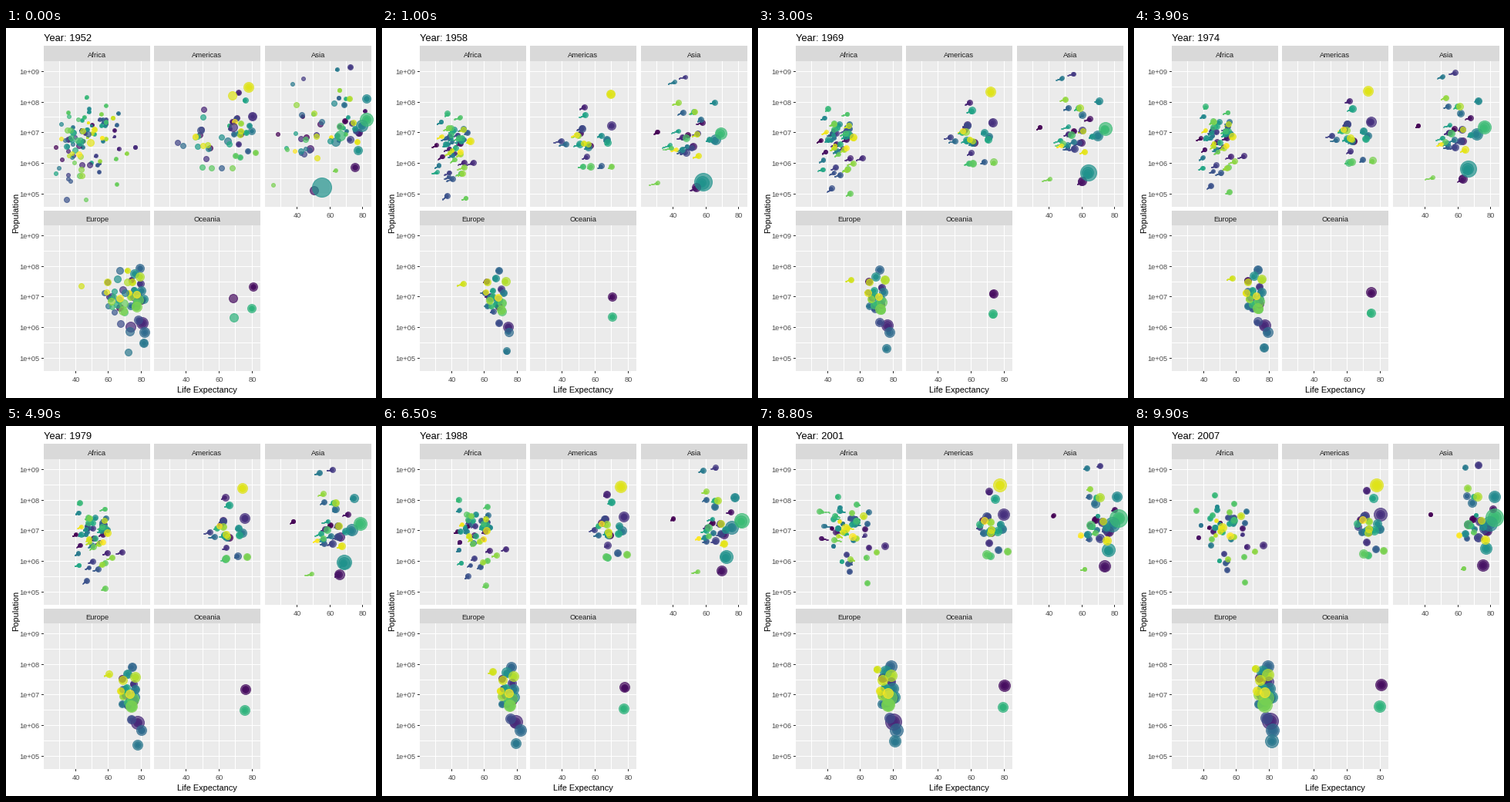
A matplotlib script that plays this animation: 480 by 480 pixels, repeating every 10 s.

```python
import numpy as np
import matplotlib
import matplotlib.pyplot as plt
from matplotlib.animation import FuncAnimation
from matplotlib.patches import Rectangle

FRAMES, WAKE, ALPHA = 100, 10, 0.7
LEFT, TOP = (49.2, 192.8, 336.4), (43, 256.2)
WIDTH, HEIGHT = 138.1, 189.6
X0, X1 = 20.65, 85.55      # life expectancy
Y0, Y1 = 4.561, 9.337      # log10 of population
TITLES = ("Africa", "Americas", "Asia", "Europe", "Oceania")
AF, AM, AS, EU, OC = range(5)

plt.rcParams["font.family"] = "Liberation Sans"
rng = np.random.default_rng(12)
u = np.linspace(0, 1, FRAMES)
gain = 1 - (1 - u) ** 1.4
xs, ys, sizes, hues = [], [], [], []


def px(region, life):
    return LEFT[region % 3] + (life - X0) / (X1 - X0) * WIDTH


def py(region, log_pop):
    return TOP[region // 3] + (Y1 - log_pop) / (Y1 - Y0) * HEIGHT


def dot(region, hue, life, pop, gdp, dip=0):
    """Ease from first to last value; dip is the life lost after 1987."""
    age = life[0] + (life[1] - life[0]) * gain - dip * np.clip(u - .64, 0, .25) * 4
    log_pop = pop[0] + (pop[1] - pop[0]) * gain
    log_gdp = gdp[0] + (gdp[1] - gdp[0]) * u
    xs.append(px(region, np.clip(age, 24, 82.5)))
    ys.append(py(region, log_pop))
    sizes.append(2 + 10 * np.sqrt(10 ** (log_gdp - 5.055)))
    hues.append(hue)


def normal(n):
    z = np.clip(rng.normal(size=n), -1.9, 1.9)
    return (z - z.mean()) / z.std()


def cloud(region, n, life, spread, pop, pop_spread, gdp, gdp_spread, dip=0):
    z, size = normal(n), normal(n)
    late, rich = .8 * z + .6 * normal(n), .7 * z + .7 * normal(n)
    growth = rng.normal(0, .08, n)
    loss = rng.exponential(dip, n)
    shade = rng.permutation(n) / (n - 1)
    for i in range(n):
        p = pop_spread * size[i]
        dot(region, shade[i],
            (life[0] + spread[0] * z[i], life[1] + spread[1] * late[i]),
            (pop[0] + p, pop[1] + p + growth[i]),
            (gdp[0] + gdp_spread * rich[i], gdp[1] + gdp_spread * rich[i]), loss[i])


cloud(AF, 48, (39, 60.5), (5, 7), (6.45, 7), .5, (3, 3.2), .3, dip=5)
cloud(AM, 21, (52.5, 73.2), (8.5, 3.7), (6.52, 6.95), .4, (3.45, 3.9), .17)
cloud(AS, 26, (47, 71.5), (9, 6.5), (6.75, 7.27), .55, (3.2, 3.8), .42)
cloud(EU, 27, (65.5, 77.7), (4.5, 2.8), (6.86, 6.98), .43, (3.72, 4.35), .2)

# Dots that stand apart from the crowd.
dot(AF, .77, (46.5, 65.5), (4.78, 5.3), (2.95, 3.2))
dot(AF, .25, (34.8, 54.8), (4.8, 5.7), (3.4, 3.3))
dot(AF, .67, (36.3, 46.9), (7.52, 8.13), (3, 3.3))
dot(AM, .95, (68.4, 78.2), (8.2, 8.48), (4.15, 4.63))
dot(AM, .1, (50.9, 72.4), (7.75, 8.28), (3.3, 3.95))
dot(AM, .14, (68.8, 80.7), (7.17, 7.52), (4.05, 4.56))
dot(AM, .58, (50.8, 76.2), (7.48, 8.04), (3.55, 4.08))
dot(AS, .504, (55.6, 77.6), (5.2, 6.4), (5.03, 4.5))
dot(AS, .05, (50.9, 75.6), (5.08, 5.85), (4, 4.47))
dot(AS, .17, (44, 73), (8.75, 9.12), (2.6, 3.7))
dot(AS, .41, (37.4, 64.7), (8.57, 9.05), (2.74, 3.4))
dot(AS, .47, (63, 82.6), (7.94, 8.1), (3.5, 4.5))
dot(AS, 0, (28.8, 43.8), (6.93, 7.5), (2.9, 3))
dot(EU, .4, (72.5, 81.8), (5.17, 5.48), (3.86, 4.56))
dot(EU, .93, (43.6, 71.8), (7.35, 7.85), (3.3, 3.93))
dot(EU, .33, (67.5, 79.4), (7.84, 7.92), (3.85, 4.51))
dot(OC, .035, (69.1, 81.2), (6.94, 7.31), (4, 4.54))
dot(OC, .645, (69.4, 80.2), (6.3, 6.61), (4.02, 4.4))

order = np.argsort(hues)
xs, ys, sizes, hues = (np.array(a)[order] for a in (xs, ys, sizes, hues))
colors = matplotlib.colormaps["viridis"](hues)
colors[:, 3] = ALPHA

fig = plt.figure(figsize=(480 / 72, 480 / 72), dpi=72, facecolor="white")
ax = fig.add_axes([0, 0, 1, 1])
ax.axis("off")


def box(x, y, w, h, color):
    ax.add_patch(Rectangle((x, y), w, h, facecolor=color, edgecolor="none",
                           antialiased=False, zorder=1))


def label(x, y, text, size=9.2, color="#4D4D4D", ha="center", **kw):
    return ax.text(x, y, text, fontsize=size, color=color, ha=ha,
                   va=kw.pop("va", "baseline"), **kw)


for region, title in enumerate(TITLES):
    left, top = int(LEFT[region % 3]), int(TOP[region // 3])
    strip = (23, 237)[region // 3]
    bottom = round(TOP[region // 3] + HEIGHT - .4)
    box(left, strip, 138, top - strip, "#D9D9D9")
    box(left, top, 138, bottom - top, "#EBEBEB")
    label(left + 69, top - 5, title, 9.4, "#1A1A1A")
    for life in range(30, 81, 10):
        x = int(px(region, life))
        box(x, top, 1, bottom - top, "white")
        if life % 20 == 0 and region >= AS:
            box(x, bottom, 1, 3, "#333333")
            label(x + .5, bottom + 14, str(life))
    for half in range(10, 19):
        y = int(py(region, half / 2))
        box(left, y, 138, 1, "white")
        if half % 2 == 0 and region % 3 == 0:
            box(left - 3, y, 3, 1, "#333333")
            label(43.5, y + 4, f"1e+{half // 2:02d}", ha="right")

label(260.5, 473, "Life Expectancy", 11, "black")
label(13, 240, "Population", 11, "black", rotation=90, va="center")
heading = label(49, 17, "", 12.9, "black", ha="left")
dots = ax.scatter(np.zeros(len(xs)), np.zeros(len(xs)), linewidths=1, zorder=3)
rgba = np.tile(colors, (WAKE + 1, 1))
dots.set_facecolor(rgba)
dots.set_edgecolor(rgba)
ax.set_xlim(0, 480)
ax.set_ylim(480, 0)

# Oldest copy first; the wake shrinks with a cubic falloff and wraps around.
ages = np.arange(WAKE, -1, -1)
shrink = (1 - ages / WAKE) ** 3


def update(i):
    when = (i - ages) % FRAMES
    dots.set_offsets(np.floor(np.column_stack(
        [xs[:, when].T.ravel(), ys[:, when].T.ravel()])))
    size = (sizes[:, when] * shrink).T.ravel()
    radius = np.maximum(1, np.floor(0.375 * (size * 2.845 + 0.945) + 0.5))
    dots.set_sizes((2 * radius - 1) ** 2)
    heading.set_text(f"Year: {1952 + 55 * u[i]:.0f}")
    return dots, heading


anim = FuncAnimation(fig, update, frames=FRAMES, interval=100, repeat=True,
                     repeat_delay=0)
plt.show()
```
